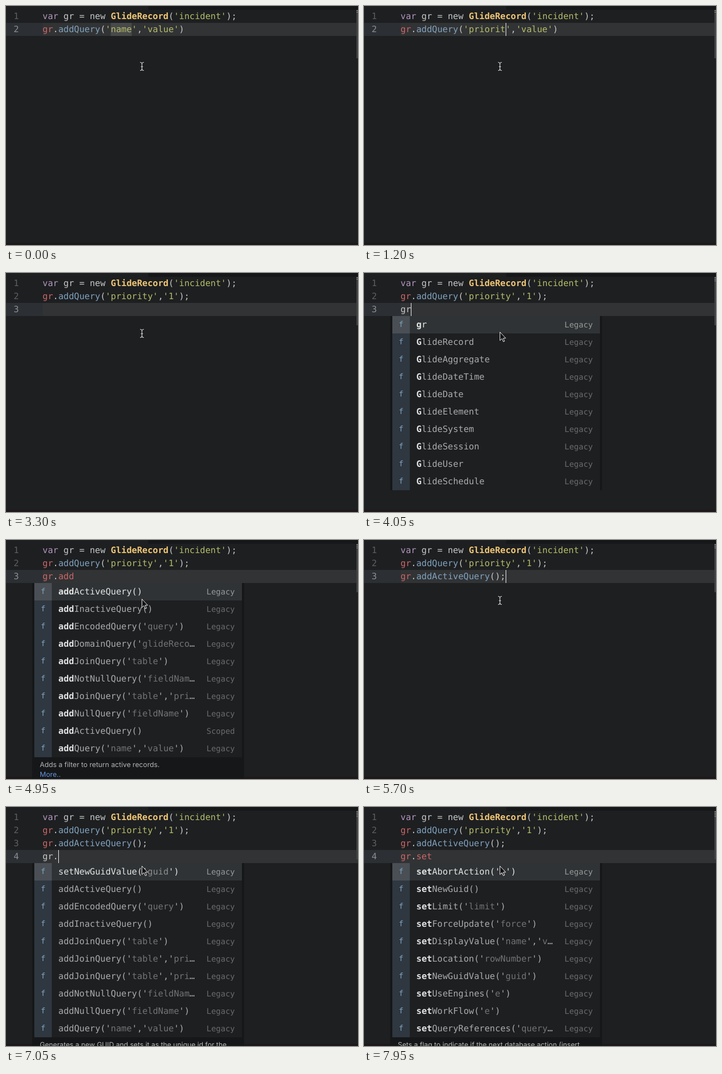
An HTML page for the animation above (8 s loop, 646 px wide and 439 px high).

```html
<!DOCTYPE html>
<html lang="en">
<head>
<meta charset="utf-8">
<title>Editor autocomplete</title>
<style>
html, body { margin: 0; width: 100%; height: 100%; overflow: hidden; background: #1d1f21; }
svg { display: block; }
text { white-space: pre; font: 16px "DejaVu Sans Mono", monospace; text-rendering: geometricPrecision; }
.label { font-size: 14.4px; }
.note { font: 12.7px Inter, sans-serif; }
</style>
</head>
<body>
<svg id="stage" width="646" height="439" viewBox="0 0 646 439"></svg>
<script>
const LOOP = 8000, CHAR = 9.632, LEFT = 67, ROW = 24, ITEM = 32;
const stage = document.getElementById('stage');
const color = { text: '#c5c8c6', keyword: '#b294bb', type: '#f0c674', name: '#cc6666', call: '#81a2be', string: '#b5bd68' };

const rect = (x, y, w, h, fill) => `<rect x="${x}" y="${y}" width="${w}" height="${h}" fill="${fill}"/>`;
const text = (x, y, body, fill, attrs = '') => `<text x="${x}" y="${y}" fill="${fill}" ${attrs}>${body}</text>`;
const span = (body, fill, bold) => `<tspan fill="${fill}"${bold ? ' font-weight="700"' : ''}>${body}</tspan>`;
const colX = col => LEFT + col * CHAR;
const rowY = row => 7 + row * ROW;

const TOKENS = [
  [/^'[^']*'/, 'string'], [/^var\b/, 'keyword'], [/^GlideRecord/, 'type'],
  [/^gr(?=\.\w)/, 'name'], [/^add\w+(?=\()/, 'call'], [/^(add|ad|a|set|se|s)$/, 'name'],
  [/^\w+/, 'text'], [/^[^\w']+/, 'text']
];

function highlight(line) {
  let out = '';
  while (line) {
    const [pattern, kind] = TOKENS.find(([p]) => p.test(line));
    const word = line.match(pattern)[0];
    out += span(word, color[kind], kind === 'type');
    line = line.slice(word.length);
  }
  return out;
}

const globals = ['gr', 'GlideRecord', 'GlideAggregate', 'GlideDateTime', 'GlideDate', 'GlideElement',
  'GlideSystem', 'GlideSession', 'GlideUser', 'GlideSchedule'];
const joins = ["addJoinQuery('table')", "addJoinQuery('table','pri…"];
const members = ["setNewGuidValue('guid')", 'addActiveQuery()', "addEncodedQuery('query')", 'addInactiveQuery()',
  ...joins, joins[1], "addNotNullQuery('fieldNam…", "addNullQuery('fieldName')", "addQuery('name','value')"];
const addAny = ['addActiveQuery()', 'addActiveQuery()|Scoped', ...members.slice(2)];
const adds = ['addActiveQuery()', 'addInactiveQuery()', "addEncodedQuery('query')", "addDomainQuery('glideReco…",
  joins[0], "addNotNullQuery('fieldNam…", joins[1], "addNullQuery('fieldName')", 'addActiveQuery()|Scoped', "addQuery('name','value')"];
const sets = ["setAbortAction('e')", 'setNewGuid()', "setLimit('limit')", "setForceUpdate('force')",
  "setDisplayValue('name','v…", "setLocation('rowNumber')", "setNewGuidValue('guid')", "setUseEngines('e')",
  "setWorkFlow('e')", "setQueryReferences('query…"];
const words = ['parseInt', 'parseFloat', 'prompt', 'prototype', 'print'];

const guidNote = 'Generates a new GUID and sets it as the unique id for the';
const activeNote = 'Adds a filter to return active records.';
const abortNote = 'Sets a flag to indicate if the next database action (insert,';

const first = "var gr = new GlideRecord('incident');";
const query = (field, value) => `gr.addQuery('${field}','${value}')`;
const second = query('priority', '1') + ';';
const third = 'gr.addActiveQuery();';

// Each state: time, lines after the first, caret column (null = hidden), extras.
const states = [];
const at = (time, lines, caret, extra = {}) => states.push({ time, lines: [first, ...lines], caret, ...extra });
const menu = (items, prefix, note, col = 3, width = 381) => ({ menu: { items, prefix, note, col, width } });

at(0, [query('name', 'value')], null, { select: [13, 4] });
at(300, [query('p', 'value')], 14, menu(words, 'p', '', 13, 239));
[[450, 3], [750, 4], [900, 6], [1200, 7], [1350, 8]].forEach(([time, n]) =>
  at(time, [query('priority'.slice(0, n), 'value')], 13 + n));
at(1500, [query('priority', 'value')], null);
at(1800, [query('priority', 'value')], null, { select: [24, 5] });
at(1950, [query('priority', '1')], 25);
at(2250, [query('priority', '1')], 27, { match: [11, 26] });
at(2550, [query('priority', '1')], null, { match: [11, 26] });
at(2850, [second], 28);
at(3000, [second, ''], 0);
at(3300, [second, ''], null);
at(3750, [second, 'g'], 1, menu(globals, 'g', '', 0));
at(4050, [second, 'gr'], 2, menu(globals, 'g', '', 0));
at(4200, [second, 'gr.'], 3, menu(members, '', guidNote));
at(4350, [second, 'gr.a'], 4, menu(addAny, 'a', activeNote));
at(4650, [second, 'gr.add'], 6, menu(adds, 'add', activeNote));
at(4950, [second, 'gr.add'], null, menu(adds, 'add', activeNote));
at(5100, [second, third.slice(0, -1)], 19, { match: [17, 18] });
at(5400, [second, third.slice(0, -1)], null, { match: [17, 18] });
at(5700, [second, third], 20);
at(5850, [second, third, ''], 0);
at(6300, [second, third, ''], null);
at(6600, [second, third, 'g'], 1, menu(globals, 'g', '', 0));
at(6750, [second, third, 'gr'], 2, menu(globals, 'g', '', 0));
at(7050, [second, third, 'gr.'], 3, menu(members, '', guidNote));
at(7200, [second, third, 'gr.s'], 4, menu(sets, 's', abortNote));
at(7350, [second, third, 'gr.se'], 5, menu(sets, 'se', abortNote));
at(7650, [second, third, 'gr.set'], 6, menu(sets, 'set', abortNote));
at(7950, [second, third, 'gr.set'], null, menu(sets, 'set', abortNote));

function drawItem(item, i, prefix, x, y, width) {
  const [label, scope = 'Legacy'] = item.split('|');
  const main = i ? '#a9abab' : '#e2e4e4';
  const hit = label.toLowerCase().startsWith(prefix) ? prefix.length : 0;
  const rest = label.slice(hit).split(/('[^'…]*)/).map(part =>
    part.length > 1 && /^'\w/.test(part)
      ? span("'", main) + span(part.slice(1), i ? '#717374' : '#8b8d8e')
      : span(part, main)).join('');
  return (i ? '' : rect(x, y, width, ITEM, '#303335'))
    + rect(x, y, 32, ITEM, i ? '#2f3740' : '#494f55')
    + text(x + 16, y + 20, 'f', '#81a2be', 'class="label" font-weight="700" text-anchor="middle"')
    + text(x + 44, y + 21, span(label.slice(0, hit), '#e2e4e4', true) + rest, main)
    + text(x + width - 13, y + 21, scope, i ? '#696b6d' : '#97999a', 'class="label" text-anchor="end"');
}

function drawMenu({ items, prefix, note, col, width }, row) {
  const x = col === 13 ? 148 : 52, y = rowY(row + 1), bottom = y + items.length * ITEM;
  let out = rect(x - 4, y, width + 8, (note ? 439 : bottom) - y, '#151719')
    + rect(x, y, width, bottom - y, '#1d1f21')
    + items.map((item, i) => drawItem(item, i, prefix, x, y + i * ITEM, width)).join('');
  if (note) {
    out += text(x + 10, bottom + 18, note, '#b4b6b6', 'class="note"')
      + text(x + 10, bottom + 36, 'More..', '#6494dc', 'class="note"');
  }
  return out;
}

const arrow = '<path d="M249.5 108.5v15.5l3.6-3.4 2.6 5.6 2.3-1-2.5-5.4h4.6z" fill="#111" stroke="#eee"/>';
const beam = '<path d="M246 103.5q3.5 0 3.5 3v9q0 3-3.5 3m7-15q-3.5 0-3.5 3m0 9q0 3 3.5 3M247.500 111.500h4" fill="none" stroke="#ddd" stroke-width="1.200"/>';

function draw(state) {
  const row = state.lines.length - 1, top = rowY(row);
  let out = rect(0, 0, 646, 439, '#1d1f21') + rect(261, 0, 385, 7, '#151719')
    + rect(0, 435, 646, 4, '#1e181a')
    + rect(0, top, LEFT, ROW, '#2c2f33') + rect(LEFT, top, 646 - LEFT, ROW, '#313335')
    + rect(643, 7, 3, 89, '#414345');
  if (state.select) out += rect(colX(state.select[0]), top, state.select[1] * CHAR, ROW, '#47494a');
  state.lines.forEach((line, i) => {
    const base = rowY(i) + 17;
    out += text(14, base, i + 1, i === row ? '#8d9091' : '#5d6062')
      + text(LEFT, base, highlight(line), color.text)
      + (line ? rect(643, 8 + i * 3, 3, 1, '#8b8d8d') : '');
  });
  (state.match || []).forEach(col => out += rect(colX(col), top + 22, CHAR, 1, color.text));
  if (state.caret !== null) out += rect(Math.round(colX(state.caret)), top, 1, ROW, '#f4f4f4');
  if (state.menu) out += drawMenu(state.menu, row);
  stage.innerHTML = out + (state.menu ? arrow : beam);
}

let shown;
const start = performance.now();
function tick() {
  const time = (performance.now() - start) % LOOP;
  const state = states.findLast(s => s.time <= time);
  if (state !== shown) draw(shown = state);
  requestAnimationFrame(tick);
}
tick();
</script>
</body>
</html>
```
